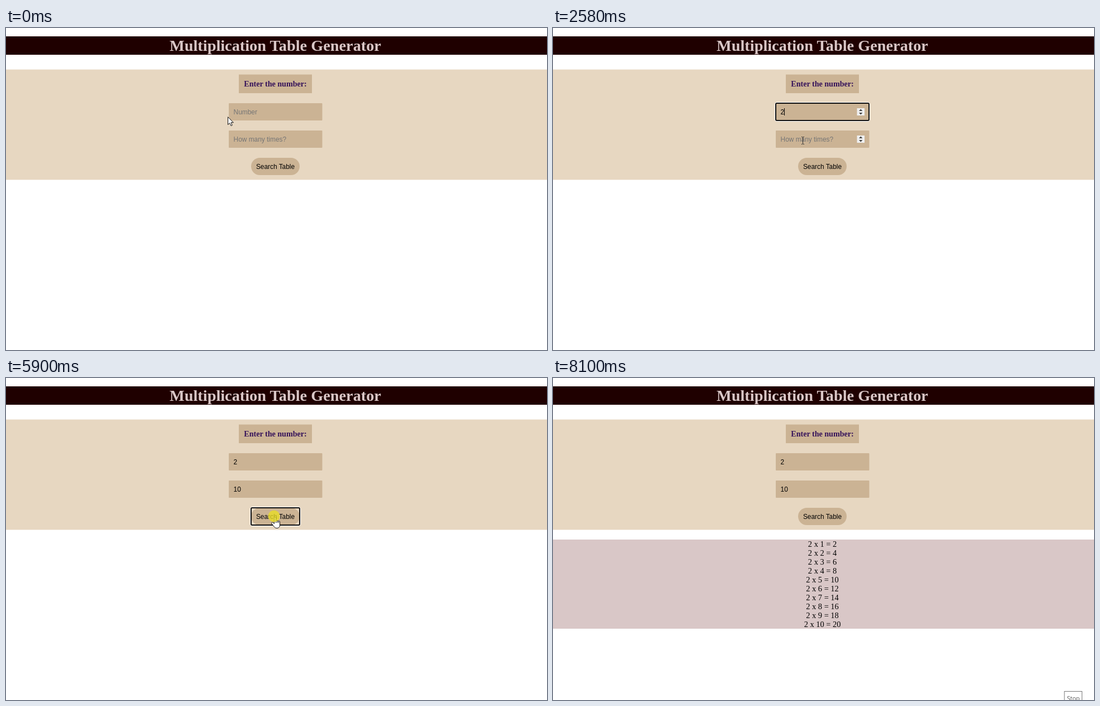
These frames come from a looping animation (969x578 px, 8170 ms). An HTML page:

```html
<!DOCTYPE html>
<html lang="en">
<head>
<meta charset="utf-8">
<title>Multiplication Table Generator</title>
<style>
  html, body { margin: 0; width: 100%; height: 100%; overflow: hidden; background: #fff; }
  svg { display: block; width: 969px; height: 578px; }
  text { white-space: pre; }
  .serif { font-family: "Liberation Serif", "Times New Roman", serif; text-anchor: middle; }
  .sans { font: 11.9px "Liberation Sans", Arial, sans-serif; fill: #000; }
  .title { font-size: 28.3px; font-weight: bold; fill: #d9c7c7; }
  .label { font-size: 14.1px; font-weight: bold; fill: #35125a; }
  .row { font-size: 14.4px; fill: #000; }
  .tan { fill: #cbb394; }
  .hint { fill: #757575; }
  .ring { fill: none; }
  .crisp { shape-rendering: crispEdges; }
  .cursor path { stroke: #111; fill: #fff; stroke-linejoin: round; }
</style>
</head>
<body>
<svg viewBox="0 0 969 578" id="stage">
  <rect y="15" width="969" height="33" fill="#1f0000"/>
  <text class="serif title" x="482.5" y="41">Multiplication Table Generator</text>
  <rect y="74.5" width="969" height="198" fill="#e7d7c1"/>
  <rect class="tan" x="417" y="83.5" width="131" height="33.5"/>
  <text class="serif label" x="482.5" y="105">Enter the number:</text>

  <g id="fields"></g>

  <rect class="tan" x="439" y="233" width="87" height="31" rx="15.5"/>
  <text class="sans" x="482.5" y="252.5" text-anchor="middle">Search Table</text>
  <g id="buttonRing"></g>

  <rect id="caret" class="crisp" width="1" height="13"/>

  <g id="table">
    <rect y="290" width="969" height="160" fill="#d9c7c7"/>
  </g>

  <g id="stop">
    <rect x="916" y="562.5" width="31.5" height="24" fill="#fff" stroke="#767676"/>
    <text x="920.5" y="579" font-family="Open Sans, sans-serif" font-size="10.8" fill="#575757">Stop</text>
  </g>

  <g id="arrow" class="cursor">
    <path d="M.5.7V14.5L3.6 11.6 6 16.5 8.2 15.6 6 10.7H10.3Z"/>
  </g>
  <g id="beam" class="cursor crisp">
    <path d="M-2.5-6.5h2M.5-6.5h2M0-6V6M-2.5 6.5h2M.5 6.5h2" transform="translate(.5 .5)" style="stroke:#333"/>
  </g>
  <g id="hand" class="cursor">
    <path transform="translate(-5 1)" d="M5.5 12.3V2a1.5 1.5 0 0 1 3 0V7.6a1.25 1.25 0 0 1 2.5.4a1.2 1.2 0 0 1 2.3.6a1.1 1.1 0 0 1 2.2.9V15q0 3-2 4.5-1.3 1-3.5 1-3 0-4.5-2.2L1 12.6q-1.2-2 .4-2.4 1.2-.3 2.3.8ZM8.5 7.6V11M11 8V11M13.3 8.6V11"/>
  </g>
  <circle id="press" r="10.5" fill="#e9de25" opacity=".78"/>
</svg>
<script>
const LOOP = 8170;
const $ = id => document.getElementById(id);
const show = (el, on) => el.setAttribute('visibility', on ? 'visible' : 'hidden');
const within = (t, a, b) => t >= a && t < b;

const ring = (x, y, w, h) => `
  <rect class="ring" x="${x - 1.5}" y="${y - 1.5}" width="${w + 3}" height="${h + 3}" rx="3.5" stroke="#fff"/>
  <rect class="ring" x="${x}" y="${y}" width="${w}" height="${h}" rx="2" stroke="#101010" stroke-width="2"/>`;

const fields = [
  { y: 135, hint: 'Number', focus: [610, 3040], typed: [[1460, '2']] },
  { y: 184, hint: 'How many times?', focus: [3040, 5900], typed: [[4200, '1'], [4360, '10']] }
];

for (const f of fields) {
  const g = document.createElementNS('http://www.w3.org/2000/svg', 'g');
  g.innerHTML = `
    <rect class="tan" x="399" y="${f.y}" width="167.5" height="31" rx="1"/>
    <text class="sans" x="407.6" y="${f.y + 19.7}"></text>
    <g>
      <rect x="544.5" y="${f.y + 9}" width="13.5" height="13" fill="#efefef"/>
      <path d="M548 ${f.y + 14}l3.2-3.6 3.2 3.6zM548 ${f.y + 17}l3.2 3.6 3.2-3.6z" fill="#404040"/>
    </g>
    <g>${ring(399, f.y, 167, 31)}</g>`;
  [, f.text, f.spin, f.ring] = g.children;
  $('fields').append(g);
}
$('buttonRing').innerHTML = ring(439, 233, 87, 31);

for (let i = 1; i <= 10; i++) {
  $('table').insertAdjacentHTML('beforeend',
    `<text class="serif row" x="482.5" y="${287 + 16 * i}">2 x ${i} = ${2 * i}</text>`);
}

// Pointer travel: first step, last step, step count, destination
const moves = [
  [70, 300, 5, 433, 156],
  [1890, 2350, 7, 447, 201],
  [4830, 4980, 3, 468.5, 235.5],
  [5100, 5130, 2, 480, 248],
  [6700, 7010, 5, 758, 540]
];
// Caret: on, off, x, y
const carets = [
  [610, 1160, 408, 144], [1460, 1960, 414, 144], [2580, 3040, 414, 144],
  [3040, 3570, 408, 193], [4120, 4200, 408, 193], [4200, 4360, 414, 193],
  [4360, 4830, 421, 193], [5440, 5900, 421, 193]
];
const presses = [[530, 680], [3040, 3110], [5900, 6050]];

function pointer(t) {
  let x = 397, y = 159;
  for (const [a, b, n, tx, ty] of moves) {
    if (t < a) break;
    const step = Math.min(n, 1 + Math.floor((t - a) / (b - a) * (n - 1) + 1e-6));
    const p = step / n, e = p * p * (3 - 2 * p);
    x += (tx - x) * e;
    y += (ty - y) * e;
  }
  return [x, y];
}

function draw(t) {
  const [px, py] = pointer(t);
  const x = Math.round(px), y = Math.round(py);
  let kind = 'arrow';

  for (const f of fields) {
    const hover = x >= 399 && x < 567 && y >= f.y && y < f.y + 31;
    const focus = within(t, ...f.focus);
    const value = f.typed.reduce((v, [at, s]) => t >= at ? s : v, '');
    if (hover) kind = 'beam';
    f.text.textContent = value || f.hint;
    f.text.classList.toggle('hint', !value);
    show(f.spin, hover || focus);
    show(f.ring, focus);
  }
  if (x >= 439 && x < 526 && y >= 233 && y < 264) kind = 'hand';

  for (const id of ['arrow', 'beam', 'hand']) {
    show($(id), id === kind && t < 7240);
    $(id).setAttribute('transform', `translate(${x} ${y})`);
  }

  const caret = carets.find(c => within(t, c[0], c[1]));
  show($('caret'), caret);
  if (caret) {
    $('caret').setAttribute('x', caret[2]);
    $('caret').setAttribute('y', caret[3]);
  }

  show($('press'), presses.some(p => within(t, ...p)));
  $('press').setAttribute('cx', x);
  $('press').setAttribute('cy', y);
  show($('buttonRing'), within(t, 5900, 8100));
  show($('table'), t >= 6050);
  show($('stop'), t >= 8020);
}

const start = performance.now();
function tick() {
  draw((performance.now() - start) % LOOP);
  requestAnimationFrame(tick);
}
draw(0);
requestAnimationFrame(tick);
</script>
</body>
</html>
```
